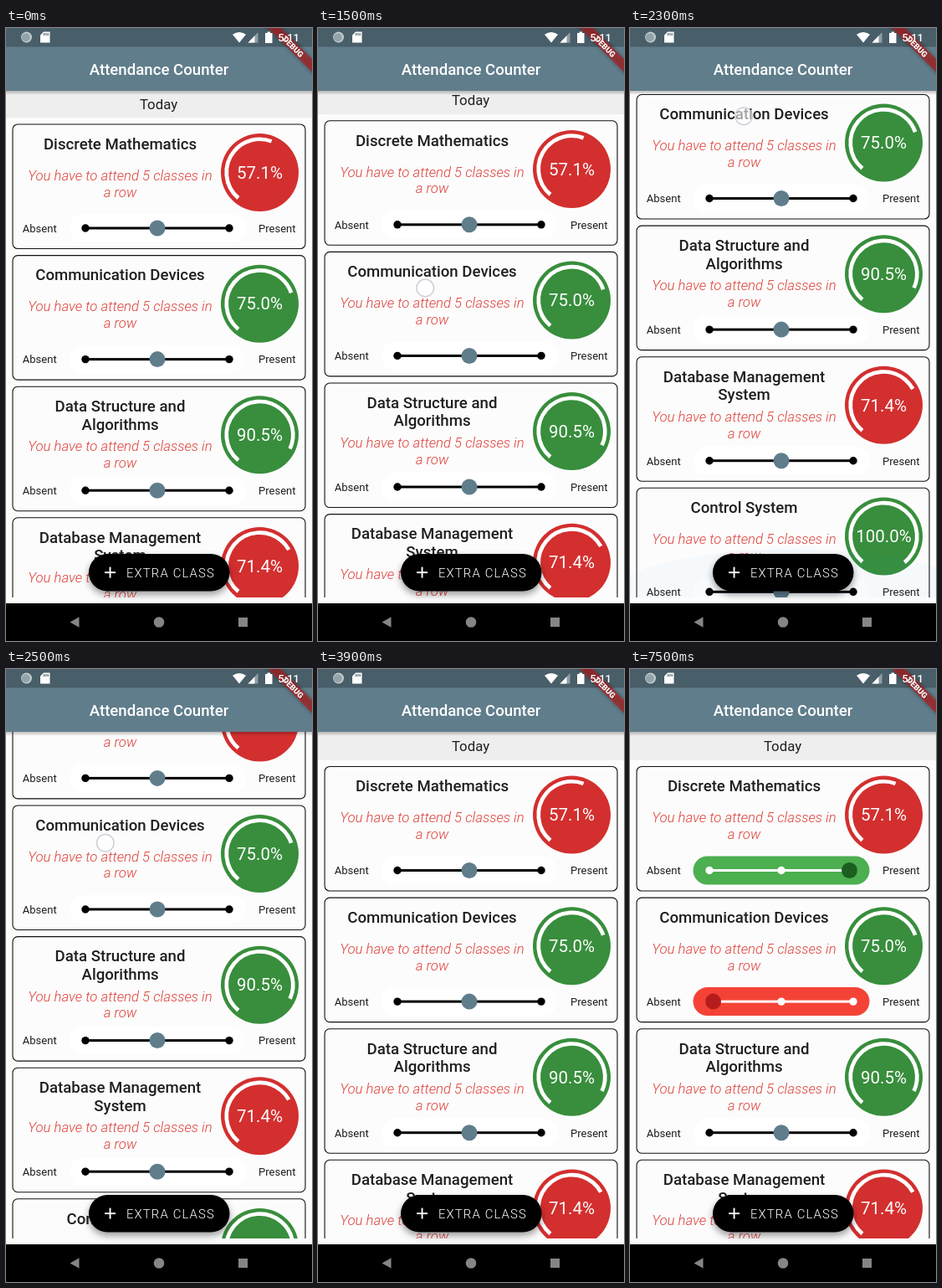
Recreate the animation shown at these times as an HTML page with a canvas. Size 366 by 732 pixels, loop 8000 ms.

```html
<!DOCTYPE html>
<html lang="en">
<head>
<meta charset="utf-8">
<title>Attendance Counter</title>
<style>
html, body { margin: 0; width: 100%; height: 100%; overflow: hidden; background: #fcfcfc; }
canvas { display: block; width: 366px; height: 732px; }
</style>
</head>
<body>
<canvas id="stage"></canvas>
<script>
const W = 366, H = 732, LOOP = 8000;
const DP = W / 392.7;
const TAU = Math.PI * 2, RAD = Math.PI / 180;
const LIST_TOP = 75, LIST_END = 680;
const CARD_TOP = 116.5, CARD_H = 148.5, PITCH = 156.6;
const MID = 181, LOW = 99.5, HIGH = 262.5;
const INK = '#1f1f1f', SLATE = '#607d8b';
const RED = '#d32f2f', GREEN = '#388e3c';

const cards = [
  { title: ['Discrete Mathematics'], pct: 57.1 },
  { title: ['Communication Devices'], pct: 75 },
  { title: ['Data Structure and', 'Algorithms'], pct: 90.5 },
  { title: ['Database Management', 'System'], pct: 71.4 },
  { title: ['Control System'], pct: 100 }
];

const canvas = document.getElementById('stage');
const ratio = window.devicePixelRatio || 1;
canvas.width = W * ratio;
canvas.height = H * ratio;
const c = canvas.getContext('2d');

const clamp = (v, a, b) => Math.min(b, Math.max(a, v));
const lerp = (a, b, u) => a + (b - a) * u;
const ramp = (t, a, b) => clamp((t - a) / (b - a), 0, 1);
const ease = (t, a, b) => { const u = ramp(t, a, b); return u * u * (3 - 2 * u); };

function text(str, x, y, dp, color, align = 'center', style = '400') {
  c.font = `${style} ${dp * DP}px Roboto, sans-serif`;
  c.textAlign = align;
  c.fillStyle = color;
  c.fillText(str, x, y);
}

function rect(x, y, w, h, color) {
  c.fillStyle = color;
  c.fillRect(x, y, w, h);
}

function disc(x, y, r, color) {
  c.fillStyle = color;
  c.beginPath();
  c.arc(x, y, r, 0, TAU);
  c.fill();
}

function poly(color, ...pts) {
  c.fillStyle = color;
  c.beginPath();
  for (let i = 0; i < pts.length; i += 2) c.lineTo(pts[i], pts[i + 1]);
  c.fill();
}

function roundPath(x, y, w, h, r) {
  c.beginPath();
  c.moveTo(x + r, y);
  c.arcTo(x + w, y, x + w, y + h, r);
  c.arcTo(x + w, y + h, x, y + h, r);
  c.arcTo(x, y + h, x, y, r);
  c.arcTo(x, y, x + w, y, r);
  c.closePath();
}

function slider(y, x) {
  const moved = Math.abs(x - MID) > 8;
  const up = x > MID;
  const line = moved ? '#fff' : '#000';
  c.fillStyle = !moved ? '#fff' : up ? '#4caf50' : '#f44336';
  roundPath(75.5, y - 17, 211, 34, 17);
  c.fill();
  rect(95, y - 1.5, 172, 3, line);
  for (const dot of [95, MID, 267]) disc(dot, y, 4.7, line);
  disc(x, y, 9.5, !moved ? SLATE : up ? '#1b5e20' : '#b71c1c');
}

function gauge(y, pct) {
  const x = 303.5;
  disc(x, y, 46.5, pct < 75 ? RED : GREEN);
  c.strokeStyle = '#fff';
  c.lineWidth = 4.7;
  c.beginPath();
  c.arc(x, y, 39.8, 130 * RAD, (130 + 281.5 * pct / 100) * RAD);
  c.stroke();
  text(pct.toFixed(1) + '%', x, y + 7.2, 22, '#fff');
}

function card({ title, pct }, y, thumb) {
  c.strokeStyle = '#111';
  c.lineWidth = 1.1;
  roundPath(8, y, 350, CARD_H, 6);
  c.stroke();
  title.forEach((s, i) => text(s, 136.5, y + 29.8 + i * 21.6, 20, INK, 'center', '500'));
  const note = y + (title.length > 1 ? 77.2 : 66.8);
  text('You have to attend 5 classes in', 136.5, note, 18, '#dd403a', 'center', 'italic 300');
  text('a row', 136.5, note + 19.7, 18, '#dd403a', 'center', 'italic 300');
  gauge(y + 57.6, pct);
  text('Absent', 19.8, y + 128.8, 14, INK, 'left');
  text('Present', 346.5, y + 128.8, 14, INK, 'right');
  slider(y + 124, thumb);
}

function glow(alpha) {
  if (alpha <= 0) return;
  c.fillStyle = `rgba(33,150,243,${alpha})`;
  c.beginPath();
  c.ellipse(195, 722, 274, 100, 0, 0, TAU);
  c.fill();
}

function list(t, scroll, thumbs) {
  c.save();
  c.beginPath();
  c.rect(0, LIST_TOP, W, LIST_END - LIST_TOP);
  c.clip();
  rect(0, LIST_TOP - scroll, W, 33.8, '#eeeeee');
  text('Today', 182.5, 98 - scroll, 18, INK);
  cards.forEach((item, i) => {
    const y = CARD_TOP + i * PITCH - scroll;
    if (y < LIST_END && y + CARD_H > LIST_TOP) card(item, y, thumbs[i] || MID);
  });
  glow(0.09 * ramp(t, 1900, 2050) * (1 - ramp(t, 2120, 2400)));
  const g = c.createLinearGradient(0, 75, 0, 80);
  g.addColorStop(0, 'rgba(0,0,0,.25)');
  g.addColorStop(1, 'rgba(0,0,0,0)');
  rect(0, 75, W, 5, g);
  c.restore();
}

function extraButton() {
  c.save();
  c.shadowColor = 'rgba(0,0,0,.4)';
  c.shadowBlur = 8 * ratio;
  c.shadowOffsetY = 4 * ratio;
  c.fillStyle = '#000';
  roundPath(99, 628, 168.5, 44.5, 22.25);
  c.fill();
  c.restore();
  rect(118, 649.2, 13, 1.9, '#fff');
  rect(123.6, 643.6, 1.9, 13, '#fff');
  c.letterSpacing = 1.2 * DP + 'px';
  text('EXTRA CLASS', 144, 655.6, 16, '#fff', 'left', '300');
  c.letterSpacing = '0px';
}

function banner() {
  const off = 40 * DP, h = 12 * DP;
  c.save();
  c.translate(W, 0);
  c.rotate(45 * RAD);
  c.shadowColor = 'rgba(0,0,0,.5)';
  c.shadowBlur = 5 * ratio;
  rect(-off * 1.5, off - h, off * 3, h, 'rgba(183,28,28,.66)');
  c.shadowColor = 'transparent';
  text('DEBUG', 0, off - h / 2 + 3.4, 10.2, '#fff', 'center', '900');
  c.restore();
}

function statusIcons() {
  disc(24.5, 11, 6.5, '#c3ccd0');
  disc(23.8, 11.3, 5, '#94a2a9');

  poly('#fff', 45, 4.5, 52.5, 4.5, 52.5, 17.5, 41, 17.5, 41, 8.5);
  for (let i = 0; i < 3; i++) rect(45 + i * 2.3, 6, 1.1, 3, '#485e68');

  c.fillStyle = '#fff';
  c.beginPath();
  c.moveTo(279, 17.5);
  c.lineTo(271, 7.8);
  c.quadraticCurveTo(279, 2.2, 287, 7.8);
  c.fill();

  poly('rgba(255,255,255,.4)', 301.5, 5, 301.5, 17.5, 289.5, 17.5);
  poly('#fff', 297.5, 9.2, 297.5, 17.5, 289.5, 17.5);

  rect(310, 6, 8.5, 12, '#fff');
  rect(312.5, 4.5, 3.5, 2, '#fff');
  text('5:11', 351, 16, 14, '#fff', 'right', '500');
}

function navBar() {
  const grey = '#858585';
  rect(0, 687, W, 45, '#000');
  poly(grey, 76.5, 709.5, 87.5, 703.3, 87.5, 715.7);
  disc(183, 709.5, 6.3, grey);
  rect(278, 704, 11, 11, grey);
}

function finger(x, y, alpha) {
  if (alpha <= 0) return;
  c.save();
  c.globalAlpha = alpha;
  disc(x, y, 10.5, 'rgba(255,255,255,.6)');
  c.strokeStyle = 'rgba(185,183,200,.65)';
  c.lineWidth = 1.5;
  c.beginPath();
  c.arc(x, y, 10.3, 0, TAU);
  c.stroke();
  c.restore();
}

const shown = (t, a, b) => ramp(t, a, a + 80) * (1 - ramp(t, b, b + 180));

function draw(t) {
  const up = ease(t, 1450, 2060), down = ease(t, 2180, 2838);
  const scroll = t < 2180 ? lerp(1.5, 212.5, up) : lerp(212.5, 0, down);
  const right = ease(t, 5680, 5900), left = ease(t, 7000, 7260);
  const rightX = lerp(MID, 307, right), leftX = lerp(MID, 56, left);

  c.setTransform(ratio, 0, 0, ratio, 0, 0);
  rect(0, 0, W, H, '#fcfcfc');
  list(t, scroll, [Math.min(rightX, HIGH), Math.max(leftX, LOW)]);
  extraButton();
  rect(0, 0, W, 75, SLATE);
  rect(0, 0, W, 22.4, '#485e68');
  text('Attendance Counter', 183, 55.6, 20, '#fff', 'center', '500');
  banner();
  statusIcons();
  navBar();

  const dragX = t < 2180 ? lerp(128, 140, up) : lerp(140, 96, down);
  const dragY = t < 2180 ? lerp(315, 82, up) : lerp(82, 343, down);
  finger(dragX, dragY, shown(t, 1380, 2840));
  finger(rightX, lerp(240, 248, right), shown(t, 5620, 5960));
  finger(leftX, lerp(397, 391, left), shown(t, 6940, 7280));
}

const start = performance.now();
function frame() {
  draw((performance.now() - start) % LOOP);
  requestAnimationFrame(frame);
}
frame();
</script>
</body>
</html>
```
